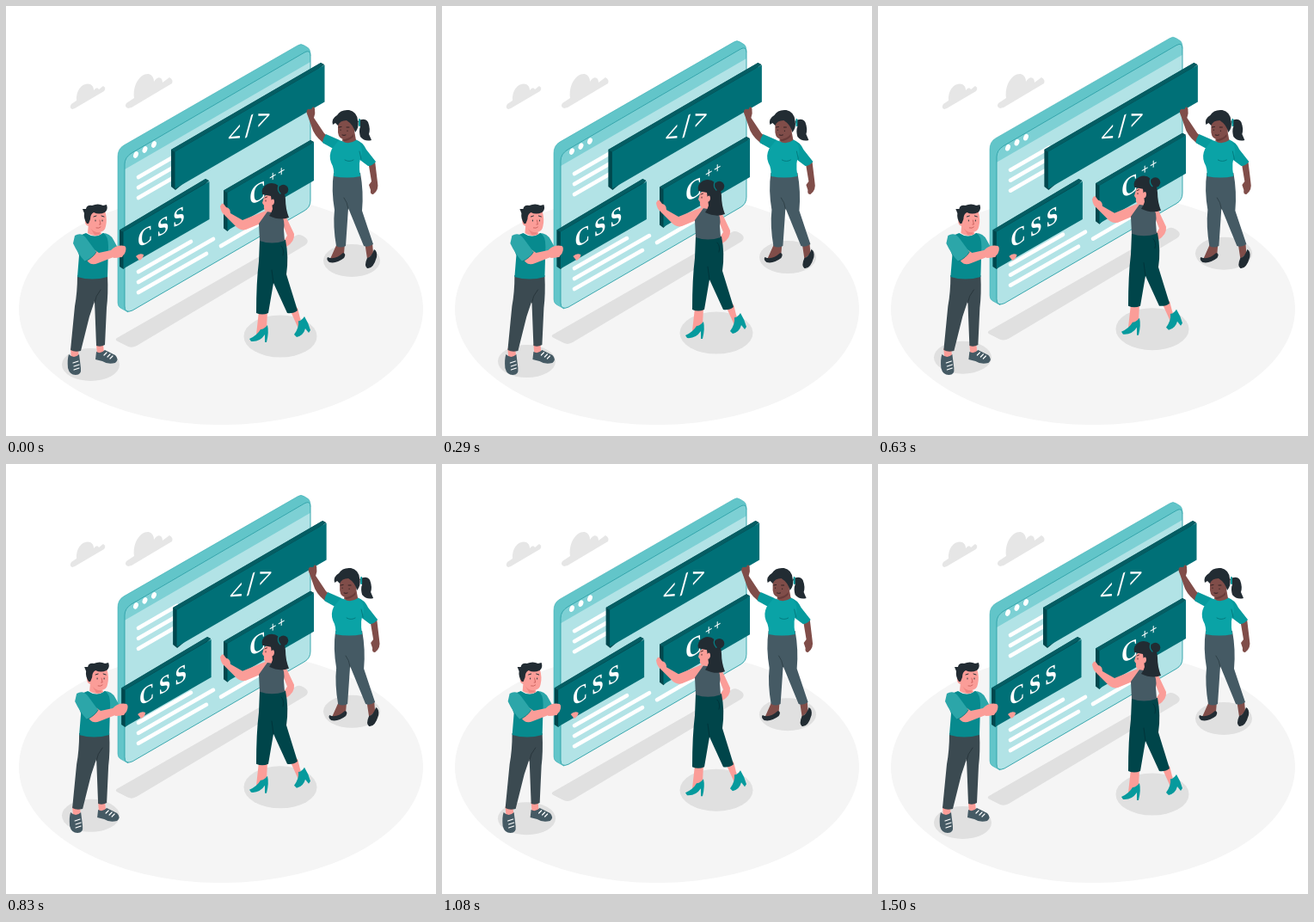
Write an HTML page that moves like this. It is 500 px wide and 500 px high and loops after 1540 ms.

```html
<!DOCTYPE html>
<html lang="en">
<head>
<meta charset="utf-8">
<title>Team building a web page</title>
<style>
  html, body { margin: 0; width: 100%; height: 100%; overflow: hidden; background: #fff; }
  svg { display: block; width: 100%; height: 100%; }
  .cloud { fill: #e6e6e6; }
  .shadow { fill: #e0e0e0; }
  .side { fill: #00474d; }
  .front { fill: #007077; }
  .edge { fill: #055d63; }
  .shirt { fill: #078a8e; }
  .sleeve { fill: #2ca6a9; }
  .teal { fill: #069a9d; }
  .blouse { fill: #0aa3a6; }
  .pink { fill: #fb9d98; }
  .pinkDeep { fill: #ee8682; }
  .brown { fill: #804d49; }
  .brownDeep { fill: #683b39; }
  .hair { fill: #222c33; }
  .slate { fill: #455a64; }
  .pants { fill: #3b4a51; }
  .pine { fill: #00454a; }
  .line { fill: none; stroke-linecap: round; stroke-linejoin: round; }
  text { fill: #fff; }
  .serif { font-family: "Liberation Serif", "Times New Roman", serif; font-weight: 700; }
  .sans { font-family: "Noto Sans", "Open Sans", sans-serif; }
</style>
</head>
<body>
<svg viewBox="0 0 500 500">
  <ellipse cx="250" cy="352" rx="235" ry="135" fill="#f5f5f5"/>
  <g class="cloud">
    <path d="M77 120Q73 118 76 114L82 110C81 98 89 88 98 91Q102 93 102 98Q106 93 108 97L113 93Q117 95 114 99L80 119Z"/>
    <path d="M142 119Q137 117 140 113L149 107C147 92 156 78 166 79Q172 81 172 88C176 81 182 82 182 89L190 83Q195 86 193 90L146 118Z"/>
  </g>

  <g class="float">
    <g class="shadow">
      <path d="M129 386L337 267Q342 264 349 270Q353 274 348 278L152 395Q147 398 142 396L130 390Q126 388 129 386Z"/>
      <ellipse cx="98.500" cy="417" rx="33.500" ry="19"/>
      <ellipse cx="402" cy="296" rx="33" ry="19"/>
      <ellipse cx="319" cy="384" rx="42.500" ry="24.500"/>
    </g>
    <!-- browser window -->
    <path d="M130 175Q130 166 137 162L339 46Q343 43 347 46L351 48.500Q354 50 354 58L146 182L142 356L133 351Q130 349 130 345Z" fill="#62c5c9" stroke="#3fb0b5" stroke-width=".6"/>
    <path d="M138 184Q138 176 146 171L347 54Q354 50 354 58V226Q354 234 347 238L147 354Q138 358 138 349Z" fill="#b2e3e6"/>
    <path d="M138 190V184Q138 176 146 171L347 54Q354 50 354 58V65Z" fill="#7dd0d4"/>
    <path d="M138 184Q138 176 146 171L347 54Q354 50 354 58V226Q354 234 347 238L147 354Q138 358 138 349Z" fill="none" stroke="#2ba0a6" stroke-width=".9"/>
    <g fill="#fff">
      <ellipse cx="151" cy="173" rx="2.700" ry="4" transform="rotate(22 151 173)"/>
      <ellipse cx="161.500" cy="167" rx="2.700" ry="4" transform="rotate(22 161.500 167)"/>
      <ellipse cx="172" cy="161" rx="2.700" ry="4" transform="rotate(22 172 161)"/>
    </g>
    <path class="line" stroke="#fff" stroke-width="4.600" d="M154 199l45 -26M154 211l45 -26M154 223l45 -26M154 309l61 -35M154 321l87 -50M154 333l79 -45M250 279l48 -28"/>
  </g>

  <g class="shake">
    <path class="side" d="M192 167L366 66L370 68L197 214L192 210Z"/>
    <path class="edge" d="M192 167L366 66L370 68.500L196 169.500Z"/>
    <path class="front" d="M196.500 169.500L370.500 68.500V111.500L196.500 212.500Z"/>
    <text class="sans" font-size="32" letter-spacing="4.800" transform="matrix(.866 -.5 0 1 257.500 165.500)">&lt;/&gt;</text>
    <path class="side" d="M132 260.500L232 201L236 203L136.500 306L132 303Z"/>
    <path class="edge" d="M132 260.500L232 201L236 203.500L136 262.500Z"/>
    <path class="front" d="M136.500 262.500L236.500 204V248L136.500 305.500Z"/>
    <text class="serif" font-size="28" letter-spacing="6" transform="matrix(.866 -.5 0 1 153 282)">CSS</text>

    <!-- man -->
    <path class="pink" d="M151 291Q155 287 160 289Q160 293 155 296Z"/>
    <path class="pink" d="M75 398L84 400L85 411L76 412ZM105 393L113 393L114 404L106 406Z"/>
    <path class="slate" d="M73 405Q79 411 85 405L87 421Q88 429 81 429Q74 429 72 421Q71 411 73 405Z"/>
    <path class="slate" d="M105 402Q110 405 115 400L127 406Q132 411 127 415Q118 417 112 413L104 411Z"/>
    <path class="line" stroke="#fff" stroke-width="1.200" d="M78 415l6 -2M79 419l6 -2M79 423l6 -2M114 406l3 -3M118 408l3 -3M121 410l3 -3"/>
    <path class="pants" d="M83 313L118 313Q119 335 117 351L115 394Q110 397 105 395L103 343L97 361L87 401Q80 403 75 400L80 349Q83 333 83 313Z"/>
    <path class="line" stroke="#29363c" stroke-width="1" d="M103 345Q104 337 110 330"/>
    <path class="pink" d="M121 288L130 279L139 284L135 292L125 293Z"/>
    <path class="sleeve" d="M112 264Q121 264 125 272L131 283L121 290L112 280Z"/>
    <path class="shirt" d="M93 264Q103 271 113 264Q119 267 119 280L118 315Q100 320 83 315L85 290L80 276Q82 267 93 264Z"/>
    <path class="pink" d="M96 253L108 257L111 265Q103 270 95 264Z"/>
    <path class="pinkDeep" d="M98 258Q102 264 109 263L109 266L103 266Z"/>
    <path class="pink" d="M95 243L100 238L115 238Q118 248 116 256Q115 263 108 263Q101 263 98 256Q92 256 92 251Q92 246 96 248Z"/>
    <path class="hair" d="M94 253Q90 247 91 241L89 236L93 236Q94 231 100 232Q107 229 113 232L117 231Q119 237 115 240Q108 243 102 240Q98 242 98 248L96 253Z"/>
    <path class="line" stroke="#263238" stroke-width="1" d="M102 245l3 -1M111 244l3 1M104 249v1M112 249v1"/>
    <path class="line" stroke="#c95f5c" stroke-width=".9" d="M109 249l1 5l-1.500 0M105 258q3 1 5 -1"/>
    <path class="pink" d="M90 291L102 283L108 287L122 284Q129 277 138 279Q141 281 138 288Q133 294 125 292L107 299Q100 302 96 298Z"/>
    <path class="sleeve" d="M80 267Q88 262 94 271L105 286Q101 293 92 297Q84 289 78 276Z"/>
    <path class="line" stroke="#04777b" stroke-width=".8" d="M105 286Q101 293 92 297"/>

    <!-- woman with ponytail -->
    <path class="hair" d="M409 134Q417 129 421 135Q424 143 422 149L425 156Q417 158 412 152Q410 145 412 140Z"/>
    <path class="brown" d="M385 276L394 276L393 288Q386 295 377 294ZM417 274L426 275L427 288L420 294Z"/>
    <path class="hair" d="M374 292Q382 296 392 287Q396 288 393 293Q384 300 376 298Q372 295 374 292Z"/>
    <path class="hair" d="M420 293Q425 292 428 283Q432 285 431 292Q427 306 420 305Q416 302 420 293Z"/>
    <path class="slate" d="M381 194L412 194Q416 216 414 238L427 277Q421 281 416 279L398 235L395 279Q389 282 384 279Q380 256 382 237Q378 214 381 194Z"/>
    <path class="line" stroke="#2f4148" stroke-width="1" d="M398 236Q397 228 393 223"/>
    <path class="brown" d="M421 180L429 180L432 205Q434 214 427 219Q423 219 424 214L422 208L425 204Z"/>
    <path class="brown" d="M351 128Q348 122 351 120L355 120Q357 115 359 119Q360 125 358 130L370 148L378 155L372 161Q362 155 357 145Z"/>
    <path class="teal" d="M372 149L388 156L386 169L368 159Q369 153 372 149Z"/>
    <path class="teal" d="M406 155Q415 158 419 167L430 181Q426 186 421 186L409 177Z"/>
    <path class="blouse" d="M387 156Q397 160 406 155Q415 160 414 172Q409 181 412 198Q397 201 381 198Q382 189 378 182Q375 174 379 166Z"/>
    <path class="line" stroke="#04777b" stroke-width=".9" d="M413 178L411 169M394 179Q399 182 404 179"/>
    <path class="brown" d="M392 147L405 145L407 156Q398 162 391 157Z"/>
    <path class="brownDeep" d="M392 154Q399 154 404 149L404 152Q399 157 393 157Z"/>
    <path class="brown" d="M386 138Q386 131 396 130Q406 131 406 141Q405 153 394 155Q387 155 386 147Z"/>
    <path class="hair" d="M380 138Q378 131 385 127Q389 120 399 121Q408 123 409 133Q411 141 406 147Q404 138 396 133Q388 133 386 139L383 136Z"/>
    <path class="line" stroke="#0b9a9d" stroke-width="2" d="M411 132v7"/>
    <path class="line" stroke="#2a1d20" stroke-width=".9" d="M387 141l3 -.5M396 141l3 0M389 144v.5M397 145v.5M391 150q2 1 4 0"/>
  </g>

  <g class="float">
    <path class="side" d="M253 214.500L354 156L358 158L257.500 262L253 258.500Z"/>
    <path class="edge" d="M253 214.500L354 156L358 158.500L257 217Z"/>
    <path class="front" d="M257.500 217L358 158.500V203L257.500 261Z"/>
    <text class="serif" font-size="31" transform="matrix(.866 -.5 0 1 283 233)">C</text>
    <text class="serif" font-size="17" letter-spacing="2" transform="matrix(.866 -.5 0 1 306 206)">++</text>

    <!-- woman with bun -->
    <path class="pink" d="M294 355L304 355L303 375L297 384L291 382ZM330 353L339 351L343 367L340 375Z"/>
    <path class="teal" d="M283 387Q292 383 296 376Q300 376 304 371Q306 379 303 391L301 391L301 382Q295 391 285 390Z"/>
    <path class="teal" d="M335 382Q341 374 340 366Q343 367 347 361Q352 369 354 377L352 380L348 375Q346 383 338 385Z"/>
    <path class="pink" d="M318 244Q325 242 328 250L335 265Q336 274 326 280L322 275L327 267Z"/>
    <path class="pine" d="M295 272L325 272Q329 292 326 312Q330 325 339 354Q334 358 327 357L311 322L305 357Q298 360 291 357Q291 321 294 297Z"/>
    <path class="line" stroke="#00343a" stroke-width="1" d="M311 322L309 307M320 279Q324 283 322 290"/>
    <path class="pink" d="M249 233Q251 228 253 230L256 234Q261 235 261 241L275 249L302 238Q308 242 303 250L279 260Q272 262 266 255L254 243Q250 240 249 233Z"/>
    <path class="slate" d="M304 239L319 239Q325 250 323 260L324 273Q309 278 295 273L294 253Z"/>
    <path class="pink" d="M300 222Q305 216 314 221L313 235L309 240L303 239Q299 237 300 232L298 229Z"/>
    <path class="hair" d="M298 219Q296 211 304 207Q311 204 317 209Q325 216 325 225Q325 236 329 246Q318 250 306 244Q309 240 310 236L308 221Z"/>
    <circle class="hair" cx="322.500" cy="213.500" r="5.800"/>
    <path class="line" stroke="#087d82" stroke-width="1.300" d="M317 209Q315 214 319 218"/>
    <path class="pink" d="M308 226Q312 222 312 228Q311 233 308 231Z"/>
    <path class="line" stroke="#3a2427" stroke-width=".9" d="M301 223l2.500 -1M302 226v1"/>
  </g>
</svg>
<script>
  const LOOP = 1540, CYCLE = 1500, FPS = 0.024, LEAD = 28;
  const shakeX = [0, -1, 2, -4, 4, -4, 4, -4, 2, -1, 0];
  const floats = document.querySelectorAll('.float');
  const shaker = document.querySelector('.shake');

  const rise = p => -10 * (1 - Math.abs(1 - 2 * p));
  function sway(p) {
    const k = Math.floor(p * 10), f = p * 10 - k;
    return shakeX[k] + (shakeX[k + 1] - shakeX[k]) * f;
  }
  // both motions are sampled at 24 poses per second
  function draw(now) {
    const pose = Math.floor((now % LOOP + 4) * FPS) % 37;
    const p = (pose / FPS + LEAD) % CYCLE / CYCLE;
    const y = rise(p) - rise(LEAD / CYCLE);
    const x = sway(p) - sway(LEAD / CYCLE);
    floats.forEach(g => g.setAttribute('transform', `translate(0 ${y.toFixed(2)})`));
    shaker.setAttribute('transform', `translate(${x.toFixed(2)} 0)`);
  }
  function tick() {
    draw(performance.now());
    requestAnimationFrame(tick);
  }
  tick();
</script>
</body>
</html>
```
